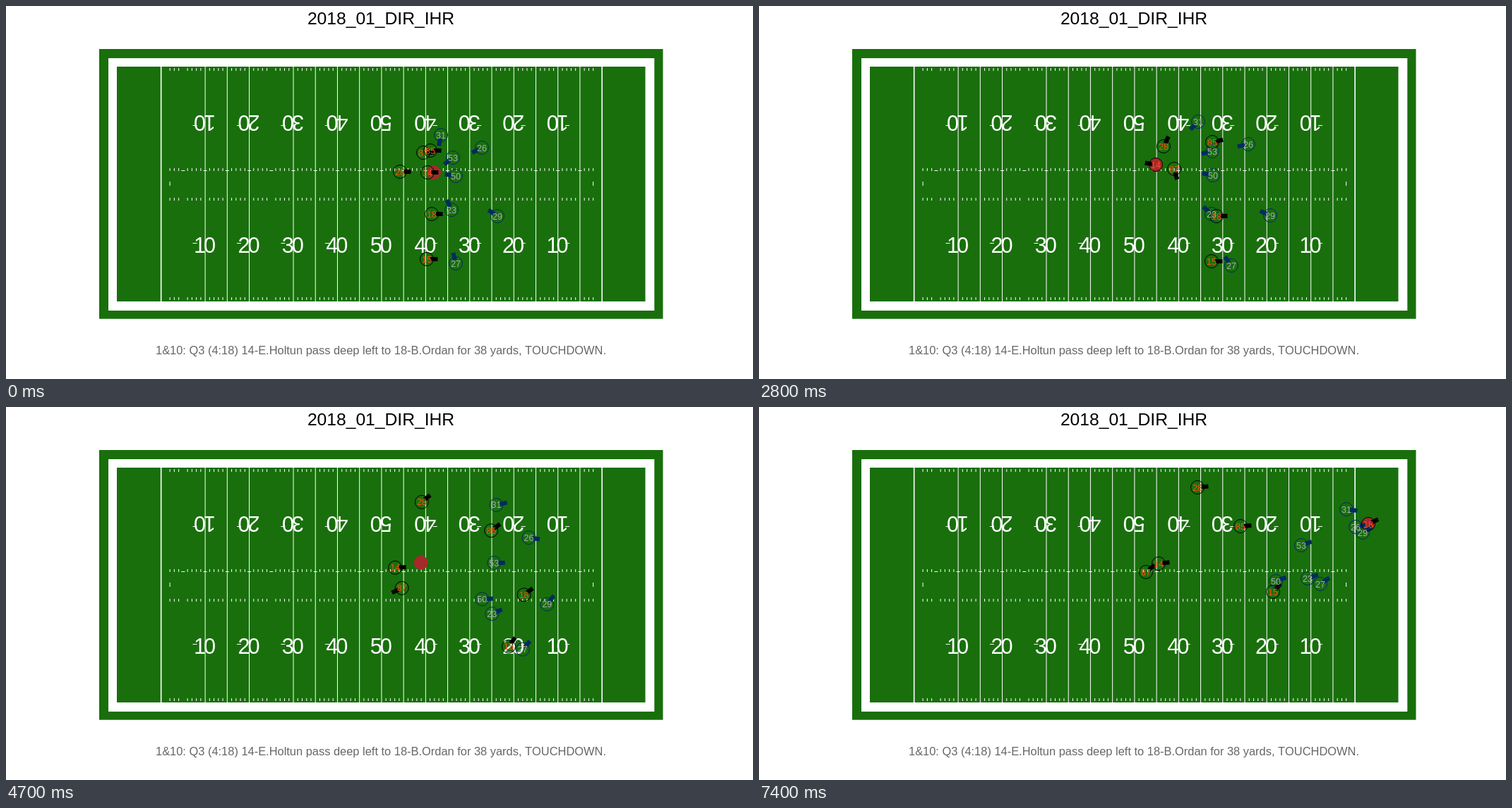
Recreate the animation shown at these times as an HTML page. Size 1058x529 px, loop 7.5 s.

```html
<!DOCTYPE html>
<html lang="en">
<head>
<meta charset="utf-8">
<title>Play animation</title>
<style>
  html, body { margin: 0; width: 100%; height: 100%; overflow: hidden; background: #fff; }
  svg { display: block; width: 100%; height: 100%; }
  text { font-family: "Liberation Sans", Arial, sans-serif; font-kerning: none; text-anchor: middle; }
  .num { font-size: 30.7px; fill: #fff; }
  .label { font-size: 12.5px; }
</style>
</head>
<body>
<svg id="stage" viewBox="0 0 1058 529">
  <text x="531" y="26" font-size="24.65">2018_01_DIR_IHR</text>
  <g id="field">
    <rect x="132" y="61" width="798.5" height="382.7" fill="#196f0c"/>
    <rect x="145" y="74" width="773.3" height="358" fill="#fff"/>
    <rect x="157" y="86" width="748.5" height="333" fill="#196f0c"/>
  </g>
  <g id="digits"></g>
  <circle id="ball" r="10" fill="#a52a2a"/>
  <g id="bars" stroke-width="6"></g>
  <g id="rings" fill="none" stroke-width="1"></g>
  <g id="labels"></g>
  <text x="531" y="494" font-size="16.43" fill="#666">1&amp;10: Q3 (4:18) 14-E.Holtun pass deep left to 18-B.Ordan for 38 yards, TOUCHDOWN.</text>
</svg>
<script>
const LOOP = 7500, STEP = 100;
const SNAP = 1400, RELEASE = 4400, MID = 5700, CATCH = 6500;
const TIMES = [SNAP, 2800, 4000, MID, 7400];
const OFFENSE = { line: '#000', label: '#fb4f14' };
const DEFENSE = { line: '#002c5f', label: '#a5acaf' };
const $ = id => document.getElementById(id);
const clamp = (v, lo, hi) => Math.min(hi, Math.max(lo, v));
const mix = (a, b, u) => a.map((v, i) => v + (b[i] - v) * u);
const sub = (a, b) => a.map((v, i) => v - b[i]);

function make(parent, tag, attrs, content) {
  const el = document.createElementNS($('stage').namespaceURI, tag);
  set(el, attrs);
  if (content !== undefined) el.textContent = content;
  return parent.appendChild(el);
}

function set(el, attrs) {
  for (const k in attrs) el.setAttribute(k, attrs[k]);
}

// Yards are measured from the left end line
const yardX = yard => 531.9 + (yard - 60) * 6.245;

function mark(x1, y1, x2, y2, width = 1) {
  make($('field'), 'line', { x1, y1, x2, y2, stroke: '#fff', 'stroke-width': width });
}

function drawNumber(yard) {
  const x = yardX(yard) - 0.6, side = Math.sign(yard - 60);
  const tens = 5 - Math.abs(yard - 60) / 10;
  for (const [y, turn] of [[350, 0], [155, 180]]) {
    const g = make($('digits'), 'g', { transform: `translate(${x} ${y}) rotate(${turn})` });
    make(g, 'text', { x: -7, class: 'num' }, tens);
    make(g, 'text', { x: 7, class: 'num' }, 0);
  }
  if (side) for (const y of [336.5, 169.5]) mark(x + side * 11, y, x + side * 17, y);
}

function drawField() {
  for (let yard = 12; yard < 109; yard++) {
    const x = yardX(yard);
    if (yard % 5) {
      for (const y of [88, 230, 272, 413]) mark(x, y, x, y + 4);
    } else {
      if (yard !== 15 && yard !== 35) mark(x, 86, x, 419);
      mark(x - 2.5, 233.5, x + 2.5, 233.5);
    }
    if (yard % 10 === 0) drawNumber(yard);
  }
  for (const yard of [10, 110]) mark(yardX(yard), 86, yardX(yard), 419, 1.6);
  for (const yard of [12, 108]) mark(yardX(yard), 249, yardX(yard), 255);
}

// Monotone cubic through the values at TIMES, starting from rest
function curve(vals) {
  const h = TIMES.slice(1).map((t, i) => t - TIMES[i]);
  const d = h.map((w, i) => (vals[i + 1] - vals[i]) / w);
  const m = vals.map((_, i) => {
    if (!i) return 0;
    if (i === d.length) return d[i - 1];
    if (d[i - 1] * d[i] <= 0) return 0;
    const a = 2 * h[i] + h[i - 1], b = h[i] + 2 * h[i - 1];
    return (a + b) / (a / d[i - 1] + b / d[i]);
  });
  return time => {
    const t = clamp(time, SNAP, TIMES[d.length]);
    let i = 0;
    while (i < d.length - 1 && t >= TIMES[i + 1]) i++;
    const u = (t - TIMES[i]) / h[i], v = 1 - u;
    return vals[i] * v * v * (1 + 2 * u) + vals[i + 1] * u * u * (3 - 2 * u)
      + h[i] * u * v * (m[i] * v - m[i + 1] * u);
  };
}

const players = {};

function player(num, team, ...route) {
  const x = curve(route.map(p => p[0])), y = curve(route.map(p => p[1]));
  players[num] = {
    team,
    at: t => [x(t), y(t)],
    bar: make($('bars'), 'line', { x1: 5, x2: 15.5, stroke: team.line }),
    ring: make($('rings'), 'circle', { r: 9.5, stroke: team.line }),
    label: make($('labels'), 'text', { class: 'label', fill: team.label }, num)
  };
}

drawField();

player(31, DEFENSE, [616, 183], [622, 164], [663, 148], [745, 131], [832, 145]);
player(26, DEFENSE, [674, 201], [693, 196], [724, 183], [767, 189], [845, 170]);
player(53, DEFENSE, [633, 215], [642, 206], [673, 221], [718, 221], [768, 196]);
player(50, DEFENSE, [637, 241], [643, 240], [660, 273], [697, 270], [732, 247]);
player(23, DEFENSE, [631, 289], [641, 295], [671, 299], [715, 276], [777, 243]);
player(29, DEFENSE, [696, 298], [724, 297], [753, 295], [787, 240], [855, 178]);
player(27, DEFENSE, [637, 365], [669, 368], [714, 362], [754, 303], [795, 251]);
player(14, OFFENSE, [597, 236], [562, 225], [550, 228], [555, 227], [566, 222]);
player(28, OFFENSE, [558, 235], [573, 199], [579, 153], [606, 119], [621, 114]);
player(87, OFFENSE, [591, 208], [588, 231], [576, 251], [543, 261], [548, 234]);
player(85, OFFENSE, [601, 205], [642, 193], [688, 180], [685, 171], [682, 169]);
player(18, OFFENSE, [603, 295], [648, 298], [703, 287], [778, 224], [863, 166]);
player(15, OFFENSE, [596, 359], [641, 362], [698, 357], [723, 302], [728, 262]);

// Held by 14, thrown, then carried by 18
function ballAt(t) {
  const passer = players[14], catcher = players[18], peak = [712, 197];
  if (t < RELEASE) {
    const [x, y] = passer.at(t);
    return [x + 9 * (1 - clamp((t - SNAP) / 600, 0, 1)), y];
  }
  if (t < MID) return mix(passer.at(RELEASE), peak, (t - RELEASE) / (MID - RELEASE));
  if (t < CATCH) return mix(peak, catcher.at(CATCH), (t - MID) / (CATCH - MID));
  return catcher.at(t);
}

// Everyone faces the way they run; defenders watch the ball until it is thrown
function heading(p, t, ball) {
  const [vx, vy] = sub(p.at(t + 300), p.at(t - 300));
  let dir = [vx + 6, vy];
  if (p.team === DEFENSE) {
    const unit = v => v.map(c => c / Math.hypot(...v));
    dir = mix(unit(sub(ball, p.at(t))), unit(dir), clamp((t - RELEASE) / 400 + 0.5, 0, 1));
  }
  return Math.atan2(dir[1], dir[0]) * 180 / Math.PI;
}

function render(t) {
  const ball = ballAt(t);
  set($('ball'), { cx: ball[0], cy: ball[1] });
  for (const p of Object.values(players)) {
    const [x, y] = p.at(t);
    set(p.bar, { transform: `translate(${x} ${y}) rotate(${heading(p, t, ball)})` });
    set(p.ring, { cx: x, cy: y });
    set(p.label, { x, y: y + 4.5 });
  }
}

const start = performance.now();
function tick() {
  const t = (performance.now() - start) % LOOP;
  render(Math.floor(t / STEP) * STEP);
  requestAnimationFrame(tick);
}
tick();
</script>
</body>
</html>
```
